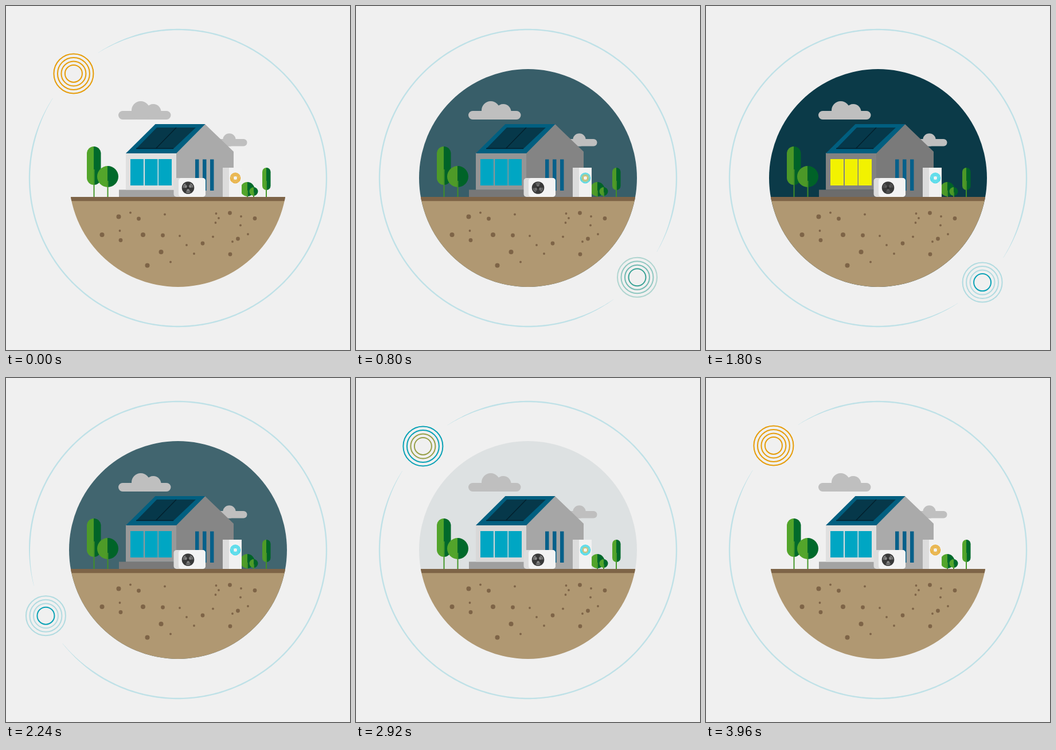
An HTML page for the animation above (4000 ms loop, 600 px wide and 600 px high).

```html
<!DOCTYPE html>
<html lang="en">
<head>
<meta charset="utf-8">
<title>Day and night house</title>
<style>
  html, body { margin: 0; width: 100%; height: 100%; overflow: hidden; background: #f0f0f0; }
  svg { display: block; width: 100vw; height: 100vh; }
</style>
</head>
<body>
<svg viewBox="0 0 600 600">
  <defs>
    <clipPath id="disc"><circle cx="300" cy="300" r="190"/></clipPath>
    <linearGradient id="halves">
      <stop offset=".5" stop-color="#53a52b"/>
      <stop offset=".5" stop-color="#006a2b"/>
    </linearGradient>
  </defs>

  <g id="orbit">
    <path id="track" fill="#bfe1e7"/>
  </g>
  <g id="sun" fill="none" stroke-width="2"></g>

  <circle id="sky" cx="300" cy="300" r="190" fill="#0b3a48"/>

  <g fill="#bfbfbf">
    <rect x="196" y="183" width="91.500" height="15" rx="7.500"/>
    <circle cx="235" cy="182" r="16"/>
    <circle cx="257" cy="184.500" r="13.500"/>
    <rect x="360" y="232" width="60.500" height="12.500" rx="6.200"/>
    <circle cx="389.500" cy="233.500" r="11.200"/>
  </g>

  <g clip-path="url(#disc)">
    <rect x="100" y="333" width="400" height="160" fill="#b09872"/>
    <rect x="100" y="333" width="400" height="7.200" fill="#7e6447"/>
    <g id="stones" fill="#7e6447"></g>
  </g>

  <g id="trees" fill="url(#halves)">
    <rect x="141" y="245" width="24.500" height="67" rx="12.200"/>
    <circle cx="177.500" cy="297.500" r="18.500"/>
    <circle cx="421" cy="319.500" r="12.500"/>
    <circle cx="432" cy="323.500" r="7.500"/>
    <rect x="447" y="282" width="14.500" height="39" rx="7.200"/>
    <path d="M153.500 285V333M177.500 305V333M421 322V333M432 325V333M454 305V333" fill="none" stroke="#46982b" stroke-width="2"/>
  </g>

  <path id="base" d="M197 320.500H300V333H197Z"/>
  <path id="front" d="M209 256H298V320.500H209Z"/>
  <path id="gable" d="M347 206L397 254V333H297V256Z"/>
  <path d="M209 257L260.500 206H347.500L297 257Z" fill="#015f80"/>
  <path d="M263 212H331L292 249H227Z" fill="#06384a"/>
  <path d="M297 212L261 249M227 248.500H292" stroke="#021f2c" stroke-width="1.300"/>
  <path id="panes" d="M217 267H240V313H217ZM242 267H264.500V313H242ZM266 267H289V313H266Z"/>
  <path d="M330 267.500h6.500v54.500h-6.500ZM343 267.500h6.500v54.500h-6.500ZM356 267.500h6.500v54.500h-6.500Z" fill="#07608a"/>

  <path d="M378 282H411V333H378Z" fill="#f1f1f1"/>
  <path d="M378 282H389V333H378Z" fill="#dcdcdc"/>
  <g id="badge" fill="none" stroke-width="1.150"></g>

  <rect x="292.500" y="300" width="55.500" height="33" rx="5" fill="#dcdcdc"/>
  <rect x="301" y="300" width="47" height="33" rx="5" fill="#f3f3f3"/>
  <circle cx="317.500" cy="317" r="10.800" fill="#393939"/>
  <g id="fan" fill="#858585"></g>
  <circle cx="317.500" cy="317" r="7" fill="none" stroke="#393939" stroke-width=".8"/>
  <circle cx="317.500" cy="317" r="2.300" fill="#2c2c2c"/>
</svg>

<script>
const LOOP = 4000, STEP = 40;
const ORANGE = [230, 157, 10], TEAL = [10, 162, 182], CYAN = [30, 212, 232];
const RADII = [15, 21.5, 28, 34.5];
const $ = id => document.getElementById(id);

function add(parent, tag, attrs) {
  const el = document.createElementNS(parent.namespaceURI, tag);
  for (const key in attrs) el.setAttribute(key, attrs[key]);
  return parent.appendChild(el);
}

const clamp = x => Math.min(1, Math.max(0, x));
const ramp = (t, from, to) => clamp((t - from) / (to - from));
const pulse = (t, a, b, c, d) => ramp(t, a, b) - ramp(t, c, d);
const mix = (a, b, k) => `rgb(${a.map((v, i) => Math.round(v + (b[i] - v) * k))})`;
const grey = (day, night, k) => mix([day, day, day], [night, night, night], k);
const glide = (t, start) => 1 - (1 - ramp(t, start, start + 1120)) ** 3.35;

// Open ring, centred on angle 0, thinning out towards the gap.
function taperedRing(radius, width, gap, taper) {
  const outer = [], inner = [];
  for (let a = gap; a <= 360 - gap; a++) {
    const edge = Math.min(a, 360 - a) - gap;
    const half = width / 2 * (0.12 + 0.88 * clamp(edge / taper));
    const c = Math.cos(a * Math.PI / 180), s = Math.sin(a * Math.PI / 180);
    const point = r => `${(300 + r * c).toFixed(2)} ${(300 + r * s).toFixed(2)}`;
    outer.push(point(radius + half));
    inner.unshift(point(radius - half));
  }
  return `M${outer.concat(inner).join("L")}Z`;
}
$("track").setAttribute("d", taperedRing(259, 2.4, 12.5, 17));

const stones = [
  [4, [[196.5, 367.5], [167.5, 399], [239, 399], [270.5, 429], [246.5, 452.5]]],
  [3.4, [[231.5, 371], [200, 408.5], [273.5, 400], [343, 414], [390.5, 361], [434, 370.5], [404.5, 406], [391, 433]]],
  [1.9, [[217, 360.5], [277, 363.5], [198.5, 392], [303, 401], [315, 417], [287, 446.5], [328, 432], [361, 402.5],
    [366.5, 362], [371, 370], [365.5, 378], [410, 367], [409, 382.5], [422, 398], [395, 411]]]
];
for (const [r, places] of stones)
  for (const [cx, cy] of places) add($("stones"), "circle", { cx, cy, r });

const sunRings = RADII.map(r => add($("sun"), "circle", { r }));
const badgeRings = RADII.map(r => add($("badge"), "circle", { cx: 400, cy: 300, r: r / 4 }));
for (let i = 0; i < 3; i++)
  add($("fan"), "path", { d: "M0 0L-4.500 -7.500Q0 -10.500 4 -8Z", transform: `rotate(${i * 120 - 60})` });

function draw(t) {
  const night = pulse(t, 0, 1000, 2000, 3000);
  const turn = 180 * (glide(t, 0) + glide(t, 1970)) - 135;
  const rad = turn * Math.PI / 180;

  $("orbit").setAttribute("transform", `rotate(${turn} 300 300)`);
  $("sun").setAttribute("transform",
    `translate(${300 + 257.5 * Math.cos(rad)} ${300 + 257.5 * Math.sin(rad)})`);
  $("sky").setAttribute("opacity", night);

  sunRings.forEach((ring, i) => {
    const warm = i < 2 ? [2600, 3100] : [3000, 3600];
    ring.setAttribute("stroke", mix(ORANGE, TEAL, pulse(t, 0, 1000, ...warm)));
    const late = (3 - i) * 100;
    const faded = i ? pulse(t, 400 + late, 850 + late, 2250, 2750) : 0;
    ring.setAttribute("stroke-opacity", 1 - 0.73 * faded);
  });
  badgeRings.forEach((ring, i) => {
    const late = (3 - i) * 230, back = 2400 + i * 320;
    ring.setAttribute("stroke", mix(ORANGE, CYAN, pulse(t, late, late + 800, back, back + 600)));
  });

  $("gable").setAttribute("fill", grey(170, 122, night));
  $("front").setAttribute("fill", grey(224, 130, night));
  $("base").setAttribute("fill", grey(163, 108, night));
  $("trees").style.filter = `brightness(${1 - 0.08 * night})`;
  $("panes").setAttribute("fill", mix([0, 166, 195], [242, 242, 0], pulse(t, 1100, 1400, 1850, 2150)));

  const spin = 1440 * ramp(t, 600, 2200);
  $("fan").setAttribute("transform", `translate(317.5 317) rotate(${spin})`);
  $("fan").setAttribute("opacity", 1 - 0.6 * pulse(t, 400, 1200, 1900, 2300));
}

const origin = performance.now();
function tick() {
  const t = (performance.now() - origin) % LOOP;
  draw(Math.floor(t / STEP) * STEP);
  requestAnimationFrame(tick);
}
tick();
</script>
</body>
</html>
```
